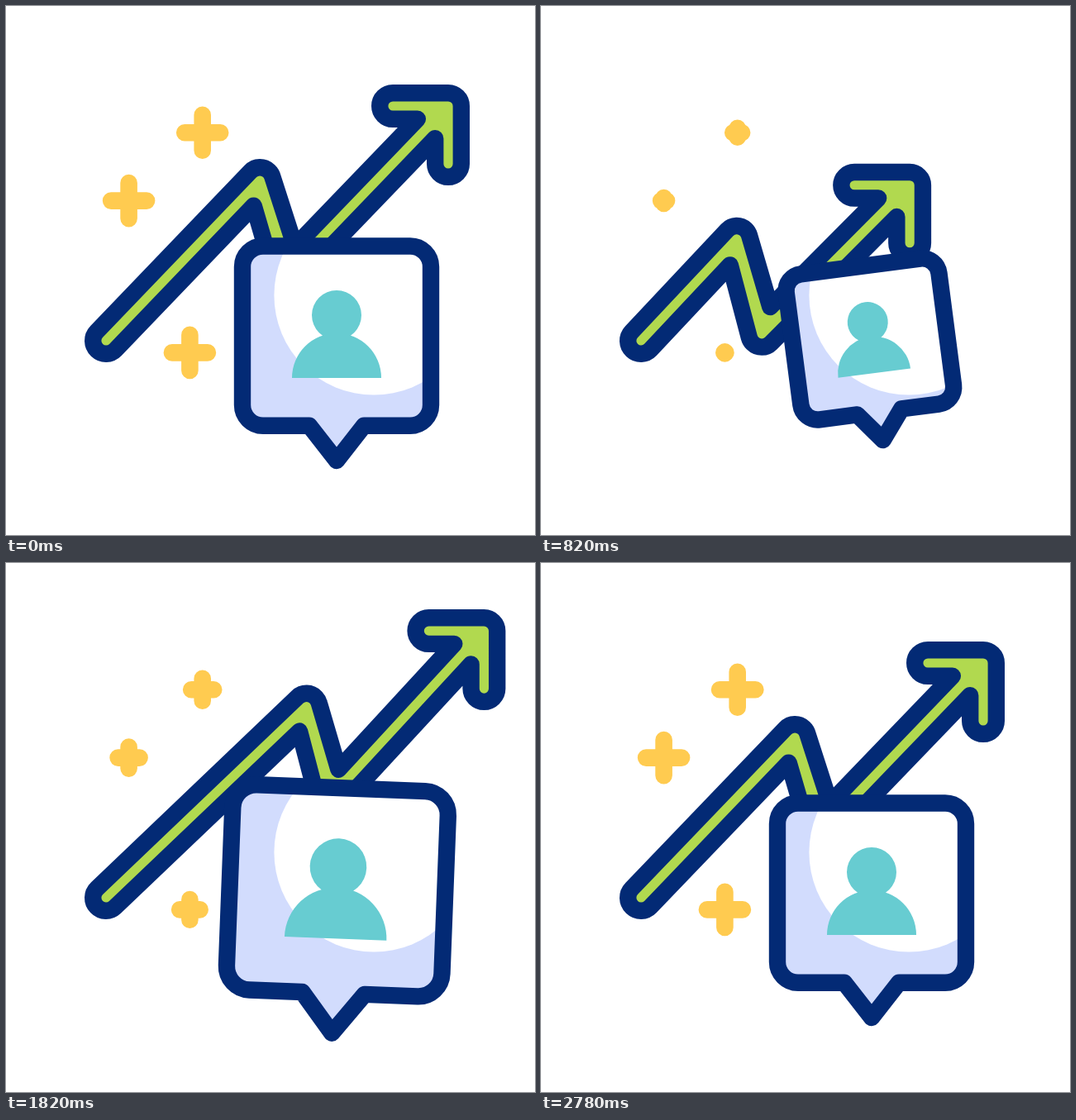
These frames come from a looping animation (640 px wide and 640 px high, 2800 ms). An HTML page with a canvas:

```html
<!DOCTYPE html>
<html lang="en">
<head>
<meta charset="utf-8">
<title>Growth</title>
<style>
  html, body { margin: 0; width: 100%; height: 100%; overflow: hidden; background: #fff; }
  canvas { display: block; width: 100vw; height: 100vh; }
</style>
</head>
<body>
<canvas id="stage" width="640" height="640"></canvas>
<script>
const ctx = document.getElementById('stage').getContext('2d');
const LOOP = 2800, HALF = LOOP / 2, PI = Math.PI;
const NAVY = '#032a75', GREEN = '#b1d94f', YELLOW = '#ffcb50',
      TEAL = '#67ccd1', LILAC = '#d2dcfd';

// Easing
const linear = x => x;
const sine = x => (1 - Math.cos(PI * x)) / 2;
const pow = p => x => x ** p;

// Value at time t; keys are [time, value, easing]
function track(t, value, ...keys) {
  let start = 0;
  for (const [end, next, ease = linear] of keys) {
    if (t < end) return value + (next - value) * ease((t - start) / (end - start));
    start = end;
    value = next;
  }
  return value;
}

function outline(path) {
  ctx.strokeStyle = NAVY;
  ctx.lineWidth = 20.4;
  ctx.stroke(path);
}

// Arrow: each joint rests at `at`, dips by `low`, then rises by `high`
const START = [121, 405];
const JOINTS = [
  { at: [307.2, 211], low: [-81.6, 82], high: [56.5, -37.5] },
  { at: [340, 323.5], low: [-84.5, 85], high: [52.5, -40] },
  { at: [535, 121], low: [-103, 111], high: [43.5, -39] }
];
const R = 15.8;

const angle = (a, b) => Math.atan2(b[1] - a[1], b[0] - a[0]);

function arrowPath(peak, dip, tip) {
  const p = new Path2D();
  const a = angle(START, peak), b = angle(peak, dip), c = angle(dip, tip);
  const arc = (o, from, to) => p.arc(o[0], o[1], R, from, to);
  // Inner corner where the outline turns left from one heading to another
  const corner = (o, from, to, dx = 0, dy = 0) => {
    const d = R / Math.cos((to - from) / 2), dir = (from + to - PI) / 2;
    p.lineTo(o[0] + d * Math.cos(dir) + dx, o[1] + d * Math.sin(dir) + dy);
  };

  arc(START, a + PI / 2, a + 1.5 * PI);
  arc(peak, a - PI / 2, b - PI / 2);
  corner(dip, b, c, 2, -2);
  corner(tip, c, -PI);
  arc([tip[0] - 67, tip[1]], PI / 2, 1.5 * PI);
  arc(tip, -PI / 2, 0);
  arc([tip[0], tip[1] + 70], 0, PI);
  corner(tip, -PI / 2, c - PI);
  arc(dip, c + PI / 2, b + PI / 2);
  corner(peak, b + PI, a + PI);
  p.closePath();
  return p;
}

function drawArrow(t) {
  const low = track(t, 0, [57, 0], [900, 1, pow(1.5)], [1060, 0, sine]);
  const high = track(t, 0, [900, 0], [1060, 0.59, sine], [1812, 1], [2090, 0, sine]);
  const path = arrowPath(...JOINTS.map(j =>
    j.at.map((v, i) => v + low * j.low[i] + high * j.high[i])));
  ctx.fillStyle = GREEN;
  ctx.fill(path);
  outline(path);
}

// Speech bubble and person, turning and scaling about one pivot
const PIVOT = [400, 419];

function bubblePath() {
  const p = new Path2D();
  p.moveTo(400, 550);
  p.lineTo(367, 507.8);
  p.arcTo(286, 507.8, 286, 400, 25);
  p.arcTo(286, 290.5, 400, 290.5, 25);
  p.arcTo(514, 290.5, 514, 400, 25);
  p.arcTo(514, 507.8, 433, 507.8, 25);
  p.lineTo(433, 507.8);
  p.closePath();
  return p;
}

function personPath() {
  const p = new Path2D();
  p.arc(400, 374, 30, 0, 2 * PI);
  p.closePath();
  p.moveTo(346, 450);
  p.arc(400, 450, 54, PI, 2 * PI);
  p.closePath();
  return p;
}

function placed(path, matrix) {
  const p = new Path2D();
  p.addPath(path, matrix);
  return p;
}

function drawBubble(t) {
  const size = track(t, 1, [163, 1], [975, 0.749, pow(1.5)], [1110, 1.014],
    [1580, 1.098], [1840, 1.147], [2180, 1]);
  const turn = track(t, 0, [163, 0], [940, -9.5, pow(1.5)], [1080, -9.5],
    [1800, 2.2, sine], [2600, 0, sine]);
  const matrix = new DOMMatrix()
    .translate(...PIVOT).rotate(turn).scale(size).translate(-PIVOT[0], -PIVOT[1]);
  const bubble = placed(bubblePath(), matrix);

  ctx.save();
  ctx.clip(bubble);
  ctx.fillStyle = LILAC;
  ctx.fillRect(0, 0, 640, 640);
  // The highlight stays still while the bubble moves over it
  ctx.fillStyle = '#fff';
  ctx.beginPath();
  ctx.arc(445, 350, 120.6, 0, 2 * PI);
  ctx.fill();
  ctx.restore();

  ctx.fillStyle = TEAL;
  ctx.fill(placed(personPath(), matrix));
  outline(bubble);
}

// Sparkles: [top time, rest time, peak arm length] per axis
const ARM = 21.5;
const SPARKS = [
  { x: 237.7, y: 153.2, delay: 165, gone: 962, across: [1190, 1395, 35], down: [1170, 1370, 31.3] },
  { x: 148.6, y: 235.6, delay: 90, gone: 912, across: [1110, 1320, 28.7], down: [1090, 1300, 28.7] },
  { x: 222.4, y: 419.4, delay: 0, gone: 850, across: [1055, 1265, 27], down: [1045, 1255, 27] }
];

function arm(t, s, [top, rest, peak]) {
  const length = track(t, ARM,
    [s.delay, ARM], [s.gone, 0, pow(1.5)], [top, peak, sine], [rest, ARM, sine],
    [HALF, ARM], [HALF + s.gone, 0, pow(1.2)], [HALF + top, peak, sine], [HALF + rest, ARM, sine]);
  return Math.max(length, 0.01);
}

function drawSpark(t, s) {
  const w = arm(t, s, s.across), h = arm(t, s, s.down);
  ctx.beginPath();
  ctx.moveTo(s.x - w, s.y);
  ctx.lineTo(s.x + w, s.y);
  ctx.moveTo(s.x, s.y - h);
  ctx.lineTo(s.x, s.y + h);
  ctx.strokeStyle = YELLOW;
  ctx.lineWidth = 20.6;
  ctx.stroke();
}

const begin = performance.now();

function frame() {
  const t = (performance.now() - begin) % LOOP;
  ctx.fillStyle = '#fff';
  ctx.fillRect(0, 0, 640, 640);
  ctx.lineCap = ctx.lineJoin = 'round';
  SPARKS.forEach(s => drawSpark(t, s));
  drawArrow(t);
  drawBubble(t);
  requestAnimationFrame(frame);
}
frame();
</script>
</body>
</html>
```
